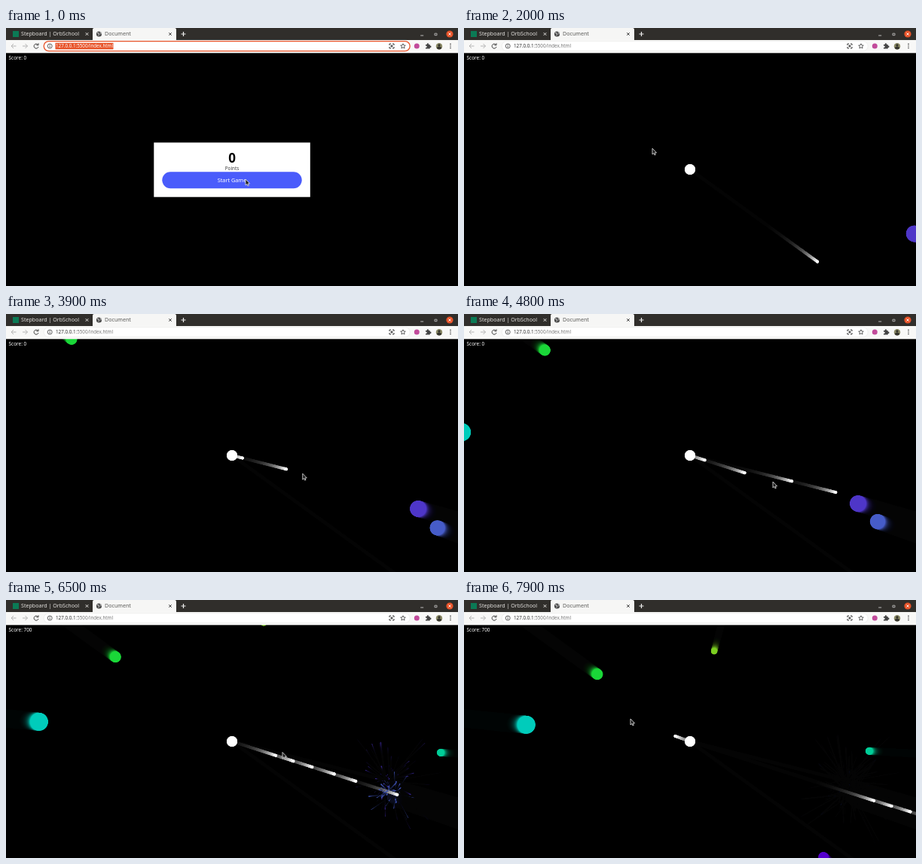
Recreate the animation shown at these times as an HTML page with a canvas. Size 600x343 px, loop 8 s.

```html
<!DOCTYPE html>
<html lang="en">
<head>
<meta charset="utf-8">
<title>Document</title>
<style>
  html, body { margin: 0; width: 100%; height: 100%; overflow: hidden; background: #000; }
  canvas { position: absolute; left: 0; top: 33px; width: 600px; height: 310px; }
  svg { position: absolute; left: 0; top: 0; width: 600px; height: 343px; }
  text { font-family: "Noto Sans", "Open Sans", sans-serif; }
  .line { fill: none; stroke: #3c3c3c; stroke-width: 1; }
</style>
</head>
<body>
<canvas id="game" width="1366" height="706"></canvas>
<svg viewBox="0 0 600 343">
  <!-- tab strip -->
  <rect width="600" height="16.5" fill="#302e2b"/>
  <path d="M115 16.5V2q0-2 2-2H224q2 0 2 2V16.5Z" fill="#f6f6f5"/>
  <rect x="9" y="4" width="8" height="8" fill="#0b7a55"/>
  <text x="20" y="10.4" font-size="7.1" fill="#e4e2df">Stepboard | OrbSchool</text>
  <circle cx="123.5" cy="8" r="3.6" fill="#4a4a4a"/>
  <path d="M121 6.5l2 .4.6 1.6-1.2 1.6M124.5 5l1.8 1.3-.6 2" fill="none" stroke="#eee" stroke-width=".9"/>
  <text x="131" y="10.4" font-size="7.1" fill="#5a5a58">Document</text>
  <path d="M105.7 6.2l3.6 3.6m0-3.6l-3.6 3.6" stroke="#e4e2df"/>
  <path d="M216.2 6.2l3.6 3.6m0-3.6l-3.6 3.6" stroke="#444"/>
  <path d="M232.5 8h6m-3-3v6" stroke="#f0f0f0" stroke-width="1.2"/>
  <path d="M550.2 10h4" stroke="#ccc" stroke-width=".9"/>
  <path d="M569 9.7V7.2h3v2.5Z" fill="none" stroke="#ccc" stroke-width=".8"/>
  <circle cx="589" cy="8" r="4.6" fill="#e8542a"/>
  <path d="M587.4 6.4l3.2 3.2m0-3.2l-3.2 3.2" stroke="#fff" stroke-width=".9"/>

  <!-- toolbar -->
  <rect y="16" width="600" height="17.3" fill="#f8f8f7"/>
  <path d="M13.5 24H7m3-3l-3 3 3 3M22 24h6.5m-3-3l3 3-3 3" class="line" style="stroke:#b4b4b4"/>
  <path d="M42.4 22.2A3 3 0 1 0 43 25M43 20.3v2.5h-2.6" class="line" stroke-width="1.1"/>
  <rect id="pill" x="50.2" y="17.6" width="486" height="13" rx="6.5" fill="#fff"/>
  <circle cx="58.2" cy="24" r="3" class="line" style="stroke-width:.8"/>
  <path d="M58.2 23.5v2.2m0-3.8v.9" class="line" style="stroke-width:.9"/>
  <rect id="mark" x="65.5" y="19.8" width="77" height="8.6" fill="#e8542a"/>
  <text x="66" y="26.3" font-size="6.25"><tspan id="host">127.0.0.1</tspan><tspan id="path">:5500/index.html</tspan></text>
  <path d="M509 23v-2h2m2 0h2v2m0 2v2h-2m-2 0h-2v-2" class="line"/>
  <rect x="510.6" y="22.6" width="2.8" height="2.8" fill="#555"/>
  <path d="M527 20.8l1 2.2 2.3.2-1.8 1.5.6 2.3-2.1-1.2-2.1 1.2.6-2.3-1.8-1.5 2.3-.2Z" class="line" style="stroke-width:.8"/>
  <circle cx="545.3" cy="24" r="3.5" fill="#c24b9b"/>
  <path d="M557 22h1.8a1.2 1.2 0 1 1 2.2 0h1.8v1.7a1.2 1.2 0 1 1 0 2.2v1.6h-5.8v-1.6a1.2 1.2 0 1 0 0-2.2Z" fill="#444"/>
  <circle cx="575" cy="24.3" r="4.2" fill="#8b8a66"/>
  <path d="M571.5 26.6q3.5-4 7 0a4.2 4.2 0 0 1-7 0Z" fill="#34332b"/>
  <circle cx="575" cy="22.9" r="1.6" fill="#34332b"/>
  <g fill="#444"><circle cx="590" cy="21.4" r=".8"/><circle cx="590" cy="24" r=".8"/><circle cx="590" cy="26.6" r=".8"/></g>

  <text id="score" x="3.6" y="42.3" font-size="6.4" fill="#fff">Score: 0</text>

  <g id="modal" text-anchor="middle">
    <rect x="196.3" y="152.3" width="207.5" height="72.4" fill="#fff"/>
    <text x="300" y="179" font-size="17" font-weight="700">0</text>
    <text x="300" y="188.8" font-size="6.3" fill="#444">Points</text>
    <rect x="207.3" y="191.3" width="185.4" height="22" rx="11" fill="#4a5cfb"/>
    <text x="300" y="205" font-size="7.3" fill="#fff">Start Game</text>
  </g>

  <path id="cursor" d="M0 0V8L1.8 6.4 3 9 4.3 8.4 3.1 5.9H5.6Z" fill="#1c1c1c" stroke="#e8e8e8" stroke-width=".8"/>
</svg>
<script>
const $ = id => document.getElementById(id);
const g = $('game').getContext('2d');
const LOOP = 8000, CLICK = 500, RATE = 0.0633;  // RATE: game ticks per ms
const SCALE = 600 / 1366, CX = 683, CY = 353;
const TAU = Math.PI * 2;

// Stage position at a moment; every enemy heads for the centre at 1 unit per tick.
const enemies = [
  { x: 523, y: 252, at: 4800, r: 25, color: 'rgb(78,54,200)' },
  { x: 549, y: 276, at: 4800, r: 23, color: 'rgb(70,92,200)' },
  { x: 132, y: 66, at: 5900, r: 17, color: 'rgb(26,215,56)' },
  { x: 27.5, y: 160.2, at: 5900, r: 27.5, color: 'rgb(0,204,187)' },
  { x: 560, y: 202, at: 7100, r: 11.5, color: 'rgb(0,206,152)' },
  { x: 332, y: 68, at: 7900, r: 10, color: 'rgb(124,206,32)' },
  { x: 477, y: 341.7, at: 7900, r: 15.5, color: 'rgb(84,0,204)' }
].map(e => {
  const dx = (e.x - 300) / SCALE, dy = (e.y - 188) / SCALE;
  return { ...e, dist: Math.hypot(dx, dy), angle: Math.atan2(dy, dx) };
});

// Launch time and direction, 5 units per tick.
const shots = [
  [503, 67, 48.6], [3368, 193, 49], [3800, 193, 49], [4255, 100, 32],
  [4655, 100, 32], [4835, 100, 32.3], [5252, 100, 32.2], [5468, 100, 32],
  [5690, 100, 32], [5878, 100, 32.2], [6054, 100, 32.3], [7749, -20, -7.2]
].map(([t, dx, dy]) => ({ t, angle: Math.atan2(dy, dx) }));

const hits = [
  { t: 4920, enemy: 0, shot: 1, points: 100 },
  { t: 5310, enemy: 0, shot: 2, points: 250 },
  { t: 5890, enemy: 1, shot: 3, points: 100 },
  { t: 6220, enemy: 1, shot: 4, points: 250 }
];

const mouse = [
  [0, 318, 201], [500, 318, 201], [1100, 268, 153], [1500, 229, 143],
  [2000, 250, 160], [2800, 377, 196], [3300, 393, 211.6], [3850, 393, 211.6],
  [4250, 410, 223], [6150, 410, 223], [7100, 270, 156], [7900, 221, 158], [8000, 221, 158]
];

let tick, seed, sparks;

function rand() {
  seed = (seed * 16807) % 2147483647;
  return seed / 2147483647;
}

function reset() {
  tick = 0;
  seed = 4711;
  sparks = [];
  g.fillStyle = '#000';
  g.fillRect(0, 0, 1366, 706);
}

function disc(x, y, r, color) {
  g.fillStyle = color;
  g.beginPath();
  g.arc(x, y, r, 0, TAU);
  g.fill();
}

const along = (angle, d) => [CX + Math.cos(angle) * d, CY + Math.sin(angle) * d];
const shotPos = (s, ms) => along(s.angle, (ms - s.t) * RATE * 5);

function radius(i, ms) {
  let r = enemies[i].r;
  for (const h of hits) {
    if (h.enemy !== i || ms < h.t) continue;
    if (h.points > 100) return 0;
    const p = Math.min(1, (ms - h.t) / 500);
    r -= 10 * (1 - (1 - p) ** 2);
  }
  return r;
}

function burst(h, before) {
  const [x, y] = shotPos(shots[h.shot], h.t);
  const count = radius(h.enemy, before) * 2;
  for (let i = 0; i < count; i++) {
    sparks.push({
      x, y, r: rand() * 2, alpha: 1, color: enemies[h.enemy].color,
      vx: (rand() - 0.5) * rand() * 6, vy: (rand() - 0.5) * rand() * 6
    });
  }
}

function step() {
  const before = tick / RATE, ms = ++tick / RATE;
  if (ms < CLICK - 10) return;
  g.fillStyle = 'rgba(0,0,0,0.1)';
  g.fillRect(0, 0, 1366, 706);
  disc(CX, CY, 16, '#fff');

  for (const h of hits) if (before < h.t && ms >= h.t) burst(h, before);
  sparks = sparks.filter(s => s.alpha > 0.005);
  for (const s of sparks) {
    g.globalAlpha = s.alpha;
    disc(s.x, s.y, s.r, s.color);
    s.vx *= 0.99;
    s.vy *= 0.99;
    s.x += s.vx;
    s.y += s.vy;
    s.alpha -= 0.01;
  }
  g.globalAlpha = 1;

  shots.forEach((s, i) => {
    const spent = hits.some(h => h.shot === i && ms >= h.t);
    if (ms >= s.t && !spent) disc(...shotPos(s, ms), 5, '#fff');
  });
  enemies.forEach((e, i) => {
    const r = radius(i, ms);
    if (r > 0) disc(...along(e.angle, e.dist - (ms - e.at) * RATE), r, e.color);
  });
}

function moveCursor(ms) {
  const i = mouse.findIndex(k => k[0] > ms);
  const [t0, x0, y0] = mouse[i - 1], [t1, x1, y1] = mouse[i];
  const p = (ms - t0) / (t1 - t0), e = p * p * (3 - 2 * p);
  $('cursor').setAttribute('transform', `translate(${x0 + (x1 - x0) * e} ${y0 + (y1 - y0) * e})`);
}

function showPage(ms) {
  const idle = ms < CLICK;
  $('modal').style.display = $('mark').style.display = idle ? '' : 'none';
  $('pill').setAttribute('stroke', idle ? '#e8542a' : '#e6e6e4');
  $('pill').setAttribute('stroke-width', idle ? 1.3 : 0.6);
  $('host').setAttribute('fill', idle ? '#fff' : '#2c2c2c');
  $('path').setAttribute('fill', idle ? '#fff' : '#777');
  const score = hits.reduce((sum, h) => sum + (ms >= h.t ? h.points : 0), 0);
  $('score').textContent = 'Score: ' + score;
}

function frame() {
  let ms = Math.floor(performance.now() % LOOP / 100) * 100;
  if (ms < 300) ms = 0;
  const goal = Math.round(ms * RATE);
  if (goal < tick) reset();
  while (tick < goal) step();
  showPage(ms);
  moveCursor(ms);
  requestAnimationFrame(frame);
}

reset();
frame();
</script>
</body>
</html>
```
